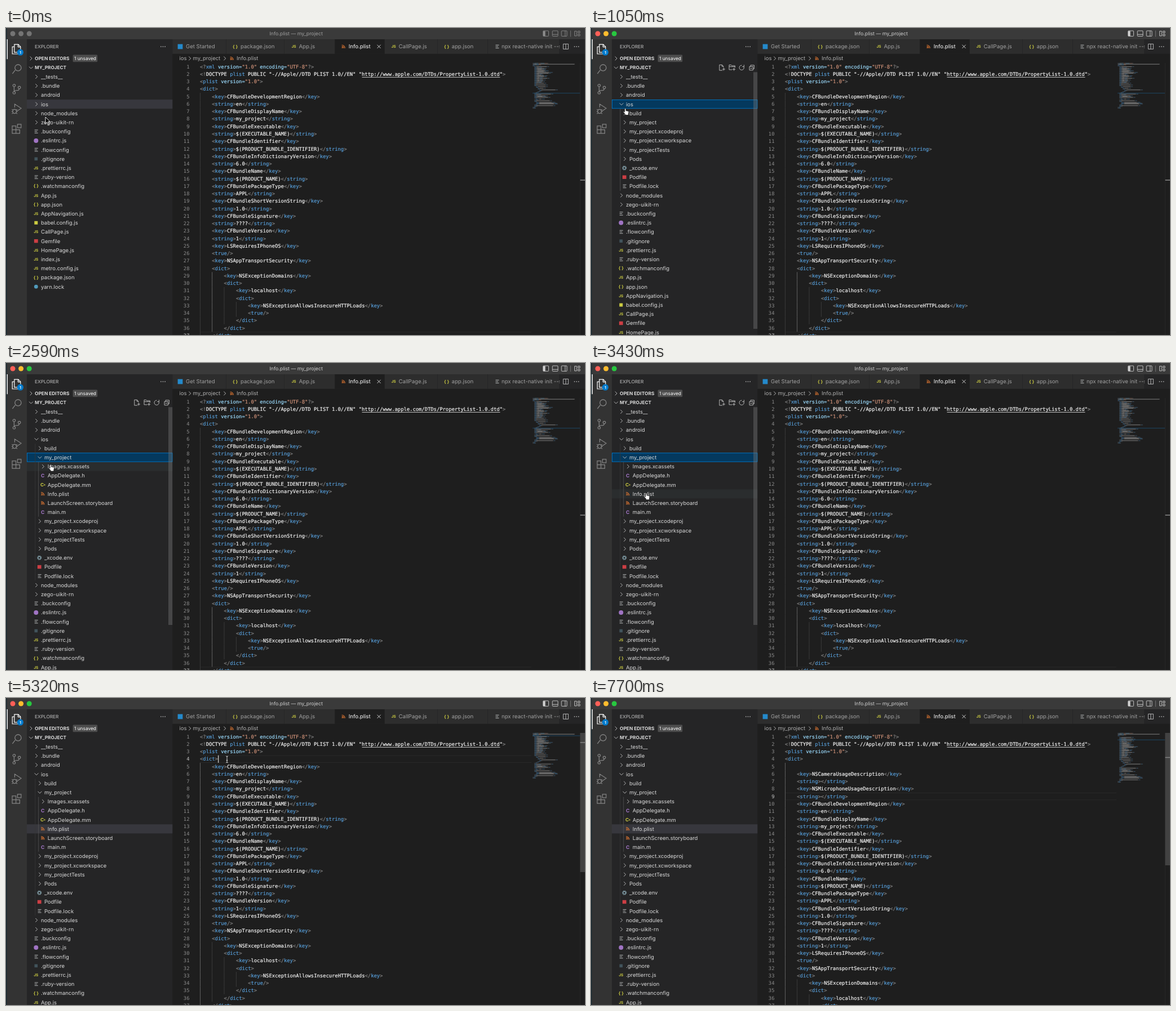
Write an HTML page that moves like this. It is 1027 by 545 pixels and loops after 8 s.

```html
<!DOCTYPE html>
<html lang="en">
<head>
<meta charset="utf-8">
<title>Info.plist — my_project</title>
<style>
html, body { margin: 0; width: 100%; height: 100%; overflow: hidden; background: #1e1e1e; }
svg { display: block; width: 100vw; height: 100vh; }
text { white-space: pre; text-rendering: geometricPrecision; font-family: Inter, "Liberation Sans", sans-serif; }
.m { font-family: "DejaVu Sans Mono", "Liberation Mono", monospace; font-size: 8.843px; stroke-width: .2px; }
.b { font-weight: 700; }
</style>
</head>
<body>
<svg viewBox="0 0 1027 545">
  <g id="frame"></g><g id="focus"></g><g id="tree"></g><g id="code"></g><g id="bar"></g><g id="caret"></g><g id="mouse"></g>
</svg>
<script>
const LOOP = 8000, STEP = 70;
const ROW = 16.205, TOP = 78.4;              // sidebar rows
const LINE = 13.257, CH = 5.324, X0 = 344, Y0 = 62; // editor grid
const MINI = 1.473, MCH = 0.7365;            // minimap grid
const YELLOW = '#cbcb41', RED = '#cc3e44', PURPLE = '#a074c4', ORANGE = '#e37933', GREY = '#c5c5c5';
const PUNCT = '#808080', TAG = '#569cd6', ATTR = '#9cdcfe', STRING = '#ce9178', PLAIN = '#f4f4f4';
const $ = id => document.getElementById(id);

const esc = s => s.replace(/&/g, '&amp;').replace(/</g, '&lt;').replace(/>/g, '&gt;');
const rect = (x, y, w, h, fill, more = '') => `<rect x="${x}" y="${y}" width="${w}" height="${h}" fill="${fill}" ${more}/>`;
const disc = (x, y, r, fill) => `<circle cx="${x}" cy="${y}" r="${r}" fill="${fill}"/>`;
const line = (d, c = GREY, w = 0.9, fill = 'none') => `<path d="${d}" stroke="${c}" stroke-width="${w}" fill="${fill}"/>`;
const text = (x, y, s, fill = '#dadada', size = 9.5, more = '') =>
  `<text x="${x}" y="${y + size * 0.36}" font-size="${size}" fill="${fill}" ${more}>${esc(s)}</text>`;
const at = (x, y, s) => `<g transform="translate(${x} ${y})">${s}</g>`;
const chevron = (x, y, open) => line(open ? `M${x - 3.4} ${y - 1.7}l3.4 3.4l3.4-3.4` : `M${x - 1.7} ${y - 3.4}l3.4 3.4l-3.4 3.4`);
const dots = (x, y) => [-3.6, 0, 3.6].map(d => disc(x + d, y, 0.85, GREY)).join('');

// File icons, centred on x, y
const icons = {
  js: (x, y) => text(x, y, 'JS', YELLOW, 6.6, 'class="b" text-anchor="middle"'),
  json: (x, y) => text(x, y - 0.3, '{ }', YELLOW, 7.8, 'class="b" text-anchor="middle"'),
  txt: (x, y) => line(`M${x - 2.6} ${y - 2.7}h6M${x - 2.6} ${y}h4.6M${x - 2.6} ${y + 2.7}h6`, '#c4c8c8', 0.9),
  lint: (x, y) => disc(x, y, 4, PURPLE),
  git: (x, y) => rect(x - 2.8, y - 2.8, 5.6, 5.6, '#41535b'),
  babel: (x, y) => rect(x - 3, y - 3, 6, 6, YELLOW),
  gem: (x, y) => rect(x - 3.4, y - 3.2, 6.8, 6.4, RED),
  yarn: (x, y) => disc(x, y, 3.4, '#519aba'),
  gear: (x, y) => `<circle cx="${x}" cy="${y}" r="3.4" fill="none" stroke="#7d98a1" stroke-width="1.4" stroke-dasharray="1.5 1.17"/>` +
    `<circle cx="${x}" cy="${y}" r="2.3" fill="none" stroke="#7d98a1" stroke-width="1.4"/>`,
  rss: (x, y) => disc(x - 2, y + 2, 0.9, ORANGE) +
    line(`M${x - 2.9} ${y - 0.4}a3.3 3.3 0 0 1 3.3 3.3M${x - 2.9} ${y - 2.7}a5.6 5.6 0 0 1 5.6 5.6`, ORANGE, 1.1),
  c: (x, y) => text(x, y, 'C', PURPLE, 8.6, 'class="b" text-anchor="middle"'),
  cpp: (x, y) => text(x - 4, y, 'C', YELLOW, 8.2, 'class="b"') + text(x + 1.3, y, '+', YELLOW, 6, 'class="b"')
};

function drawFrame() {
  const dim = '#858585';
  let s = rect(0, 0, 1027, 545, '#1e1e1e') + rect(0, 0, 1027, 20, '#3a3a3a') +
    rect(0, 20, 37, 525, '#333333') + rect(37, 20, 258.3, 525, '#252526') +
    rect(295.3, 20, 731.7, 25.8, '#252526') + rect(0, 0, 1.4, 545, '#14262e') +
    rect(1.6, 20, 1.4, 35.3, '#ffffff');
  // activity bar
  s += line('M14.8 29.2h7l4 4v10h-11zM14.6 33.4h-3.4v12.6h9.6v-2.8M21.4 29.4v4.2h4.2', '#ffffff', 1.2) +
    disc(25.4, 43.2, 5.6, '#007acc') + text(25.4, 43.2, '1', '#fff', 6.8, 'class="b" text-anchor="middle"') +
    line('M16.2 74.8L11.4 81.2M27 70.6a5.6 5.6 0 1 1-11.2 0a5.6 5.6 0 1 1 11.2 0', dim, 1.3) +
    line('M16.6 102a2.2 2.2 0 1 1-4.4 0a2.2 2.2 0 1 1 4.4 0M16.6 115a2.2 2.2 0 1 1-4.4 0a2.2 2.2 0 1 1 4.4 0M25.8 105.6a2.2 2.2 0 1 1-4.4 0a2.2 2.2 0 1 1 4.4 0M14.4 104.2v8.6M23.6 107.8q-.4 3-4 3h-2q-3 0-3.2 2', dim, 1.2) +
    line('M15.4 141v-6l11.6 7.4l-7.4 5M18.4 148a3.2 3.6 0 1 1-6.4 0a3.2 3.6 0 1 1 6.4 0M10.4 144.6l2 1.4M20 144.6l-2 1.4M10 148.4h2M20.4 148.4h-2M10.4 152.4l2-1.6M20 152.4l-2-1.6', dim, 1.2) +
    line('M11 173.8h6.6v13.4h-6.6zM11 180.6h13.4v6.6h-13.4M20.4 170.8h6.4v6.4h-6.4z', dim, 1.2);
  // sidebar headings
  s += text(51, 33, 'EXPLORER', '#c4c4c4', 8.3) + dots(278.5, 33) + chevron(44.4, 54, false) +
    text(51, 54, 'OPEN EDITORS', '#dadada', 8.35, 'class="b"') +
    rect(118.6, 47.6, 43.6, 12.6, '#4d4d4d', 'rx="1.5"') + text(121, 54, '1 unsaved', '#ffffff', 8.3) +
    chevron(44.4, 70.4, true) + text(51, 70.4, 'MY_PROJECT', '#dadada', 8.2, 'class="b"');
  // tabs: left, right, icon x, label x, icon, label
  const tabs = [
    [295.3, 391, 309, 319, '', 'Get Started'], [391, 494, 406.5, 416, 'json', 'package.json'],
    [494, 583.6, 510.5, 519.5, 'js', 'App.js'], [583.6, 672, 598.5, 607.8, 'rss', 'Info.plist'],
    [672, 766, 687.5, 696.5, 'js', 'CallPage.js'], [766, 855, 781.5, 790.5, 'json', 'app.json'],
    [855, 982, 871, 879, 'txt', 'npx react-native init --s']];
  s += '<clipPath id="strip"><rect x="295" y="20" width="687" height="26"/></clipPath><g clip-path="url(#strip)">';
  for (const [l, r, ix, lx, icon, name] of tabs) {
    const on = icon === 'rss';
    s += rect(l, 20, r - l - 0.7, 25.8, on ? '#1e1e1e' : '#2d2d2d') +
      (icon ? icons[icon](ix, 33) : rect(ix - 4.4, 28.6, 8.8, 8.8, '#2489ca')) +
      text(lx, 33, name, on ? '#ffffff' : '#a0a0a0', 9.6);
  }
  s += '</g>' + line('M658.4 29.8l6.2 6.2M664.6 29.8l-6.2 6.2', '#e0e0e0') +
    line('M988.4 28.4h9v9h-9zM992.9 28.4v9') + dots(1012, 33);
  // breadcrumbs
  const crumb = '#b0b0b0';
  s += text(307.5, 54, 'ios', crumb) + chevron(326, 54) + text(331.5, 54, 'my_project', crumb) +
    chevron(388, 54) + icons.rss(400.5, 54) + text(409, 54, 'Info.plist', crumb);
  return s;
}

// Title bar parts that change when the window gains focus
function drawFocus(on) {
  const lights = on ? ['#ff5f57', '#febc2e', '#28c840'] : Array(3).fill('#747474');
  const tint = on ? '#d0d0d0' : '#8c8c8c';
  const pane = x => `<rect x="${x - 4.8}" y="5" width="9.8" height="9.6" rx="1" fill="none" stroke="${tint}" stroke-width=".9"/>`;
  return lights.map((c, i) => disc(12 + 14.6 * i, 10, 4.5, c)).join('') +
    text(514.6, 10, 'Info.plist — my_project', on ? '#d0d0d0' : '#a0a0a0', 8.8, 'text-anchor="middle"') +
    pane(957.5) + rect(953, 5.4, 3.6, 8.8, tint) + pane(974) + line('M969.2 11.4h9.8', tint) +
    pane(990) + line('M991.8 5v9.6', tint) + line('M1001.5 4.5v11', '#777') +
    line('M1008.6 5.6h3.6v8.4h-3.6zM1014.6 5.6h3.4v3h-3.4zM1014.6 11h3.4v3h-3.4z', tint);
}

const headActions =
  line('M233.4 75.2h-5.6v-9.8h4.6l2.4 2.4v2M232.2 65.6v2.6h2.6M235.4 70.6v5M232.9 73.1h5') +
  line('M250.6 74h-5.6v-8.4h3.6l1.2 1.4h5.6v3.4M245 68.6h10M253.6 70.8v5M251.1 73.3h5') +
  line('M270.9 68.4a4.2 4.2 0 1 1-3.4-2.2M271.4 65.4v3.2h-3.2') +
  line('M281 68.4h6.4v6.4h-6.4zM283 68.2v-2.2h6.4v6.4h-2M282.6 71.6h3.2');

// Each entry: icon (or > folder, v open folder) and label
const split = (s, depth) => s.split('|').map(e => [...e.split(' '), depth]);
const HEAD = split('> __tests__|> .bundle|> android', 0);
const IOS = split('> my_project.xcodeproj|> my_project.xcworkspace|> my_projectTests|> Pods|gear _xcode.env|gem Podfile|txt Podfile.lock', 1);
const APP = split('> Images.xcassets|c AppDelegate.h|cpp AppDelegate.mm|rss Info.plist|rss LaunchScreen.storyboard|c main.m', 2);
const TAIL = split('> node_modules|> zego-uikit-rn|txt .buckconfig|lint .eslintrc.js|txt .flowconfig|git .gitignore|js .prettierrc.js|txt .ruby-version|json .watchmanconfig|js App.js|json app.json|js AppNavigation.js|babel babel.config.js|js CallPage.js|gem Gemfile|js HomePage.js|js index.js|js metro.config.js|json package.json|yarn yarn.lock', 0);

function drawTree({ open, sel, focus, hover, actions, scroll }) {
  const rows = [...HEAD, [open ? 'v' : '>', 'ios', 0]];
  if (open) rows.push(['>', 'build', 1], [open > 1 ? 'v' : '>', 'my_project', 1], ...(open > 1 ? APP : []), ...IOS);
  rows.push(...TAIL);
  const fill = (i, c) => rect(37, TOP + i * ROW, 258.3, ROW, c);
  let s = '';
  if (hover >= 0 && hover !== sel) s += fill(hover, '#2a2d2e');
  s += fill(sel, focus ? '#04395e' : '#37373d');
  if (focus) s += rect(37.4, TOP + sel * ROW + 0.4, 257.5, ROW - 0.8, 'none', 'stroke="#007fd4" stroke-width=".8"');
  rows.forEach(([kind, name, d], i) => {
    const y = TOP + (i + 0.5) * ROW, dx = d * 5.9;
    if (y > 560) return;
    for (let g = 1; g <= d; g++)
      s += rect(45.6 + g * 5.9, y - ROW / 2, 0.75, ROW, g === open ? '#585858' : '#383838');
    s += kind === '>' || kind === 'v' ? chevron(54 + dx, y, kind === 'v') : icons[kind](53.3 + dx, y);
    s += text(62 + dx, y, name, '#dadada', 9.45);
  });
  if (scroll) s += rect(288, TOP, 7.2, (open > 1 ? 465 : 534) - TOP, '#797979', 'opacity=".4"');
  return s + (actions ? headActions : '');
}

// Property list
const str = v => `<string>${v}</string>`;
const pairs = list => list.split('|').flatMap(p => {
  const [k, v] = p.split(':');
  return [`<key>${k}</key>`, ...(v === undefined ? [] : [v[0] === '<' ? v : str(v)])];
});
const PLIST = [
  '<?xml version="1.0" encoding="UTF-8"?>',
  '<!DOCTYPE plist PUBLIC "-//Apple//DTD PLIST 1.0//EN" "http://www.apple.com/DTDs/PropertyList-1.0.dtd">',
  '<plist version="1.0">', '<dict>',
  ...pairs('CFBundleDevelopmentRegion:en|CFBundleDisplayName:my_project|CFBundleExecutable:$(EXECUTABLE_NAME)|CFBundleIdentifier:$(PRODUCT_BUNDLE_IDENTIFIER)|CFBundleInfoDictionaryVersion:6.0|CFBundleName:$(PRODUCT_NAME)|CFBundlePackageType:APPL|CFBundleShortVersionString:1.0|CFBundleSignature:????|CFBundleVersion:1|LSRequiresIPhoneOS:<true/>|NSAppTransportSecurity'),
  '<dict>', ...pairs('NSExceptionDomains'), '<dict>', ...pairs('localhost'), '<dict>',
  ...pairs('NSExceptionAllowsInsecureHTTPLoads:<true/>'), '</dict>', '</dict>', '</dict>',
  ...pairs('NSLocationWhenInUseUsageDescription:|UILaunchStoryboardName:LaunchScreen|UIRequiredDeviceCapabilities'),
  '<array>', str('armv7'), '</array>', ...pairs('UISupportedInterfaceOrientations'), '<array>',
  ...['Portrait', 'LandscapeLeft', 'LandscapeRight'].map(o => str('UIInterfaceOrientation' + o)), '</array>',
  ...pairs('UIViewControllerBasedStatusBarAppearance:<false/>'), '</dict>', '</plist>'];
const PASTE = pairs('NSCameraUsageDescription:|NSMicrophoneUsageDescription:');

function tokens(s) {
  const doctype = s.match(/^(<!)(DOCTYPE )(\w+)(.*)(>)$/);
  if (doctype) return [PUNCT, PLAIN, TAG, PLAIN, PUNCT].map((c, i) => [doctype[i + 1], c]);
  const out = [];
  let inside = false;
  for (const [all, lt, tag, gt, quoted] of s.matchAll(/(<[?\/]?)(\w+)|([?\/]?>)|("[^"]*")|[^<>"]+/g)) {
    if (lt) { out.push([lt, PUNCT], [tag, TAG]); inside = true; }
    else if (gt) { out.push([gt, PUNCT]); inside = false; }
    else out.push([all, quoted ? STRING : inside ? ATTR : PLAIN]);
  }
  return out;
}

// Cursor line, overview mark and slider end for each editing phase
const PHASES = [
  { row: 37, mark: 270, end: 309 }, { row: 4, col: 6, mark: 79, end: 309 },
  { row: 5, col: 0, mark: 84.5, end: 306 }, { row: 9, col: 21, mark: 105.5, end: 297 }];

function drawCode(phase) {
  const { row, mark } = PHASES[phase], lines = PLIST.slice();
  if (phase > 1) lines.splice(4, 0, '', ...(phase > 2 ? PASTE : []));
  const y = Y0 + (row - 1) * LINE;
  let s = line(`M${X0} ${y + 0.5}H932M${X0} ${y + LINE - 0.5}H932`, '#292929', 1.1);
  s += rect(934, Y0 + (row - 1) * MINI, 84, 1.2, '#1d4059');
  let mini = '', depth = 0;
  lines.forEach((l, i) => {
    if (/^<\/(dict|array)/.test(l)) depth--;
    const top = Y0 + i * LINE, parts = tokens(l);
    if (top < 545) {
      for (let g = 0; g < depth; g++) {
        const lit = phase ? g === 0 : g === 1;
        s += rect(X0 + g * 4 * CH, top, 0.8, LINE, lit ? '#707070' : '#404040');
      }
      const base = top + LINE / 2 + 3.06;
      s += `<text class="m" x="325.5" y="${base}" text-anchor="end" fill="${i + 1 === row ? '#c6c6c6' : '#8c8c8c'}">${i + 1}</text>`;
      s += `<text class="m" x="${X0 + depth * 4 * CH}" y="${base}">` +
        parts.map(([p, c]) => `<tspan fill="${c}" stroke="${c}">${esc(p)}</tspan>`).join('') + '</text>';
    }
    let x = 934 + depth * 4 * MCH;
    for (const [p, c] of parts) {
      mini += rect(x, Y0 + i * MINI + 0.25, p.length * MCH, 0.95, c);
      x += p.length * MCH;
    }
    if (/^<(dict|array)>/.test(l)) depth++;
  });
  s += line(`M${X0 + 54 * CH} 87.4h${46 * CH}`, PLAIN, 0.8);
  return s + `<g opacity=".48">${mini}</g>` + rect(1018, Y0, 0.7, 483, '#2b2b2b') + rect(1018.5, mark - 0.7, 8.5, 1.5, '#8a8a8a');
}

const BEAM = 'M-2-6q2 0 2 1.6V4.4q0 1.6-2 1.6M2-6q-2 0-2 1.6M2 6q-2 0-2-1.6M-1.3 1.6h2.6';
const MICE = {
  arrow: line('M0 0v11.6l2.7-2.5l1.9 4.3l1.9-.8l-1.9-4.2h3.6z', '#ffffff', 0.9, '#000000'),
  hand: line('M-1.2 6V1a1.1 1.1 0 0 1 2.2 0V4l4 .8q1.2.4 1 2L5.4 9.6V11.8H-.4V10.2L-3.6 6.6q.4-1.6 2.4-.2z', '#111111', 0.7, '#ffffff'),
  beam: line(BEAM, '#000000', 1.9) + line(BEAM, '#ffffff', 0.9)
};
// Pointer path: time, x, y
const PATH = [
  [0, 70, 158], [210, 70, 158], [700, 63, 138], [1050, 61, 142.8], [1820, 61, 166], [2310, 61, 166],
  [3150, 132, 221], [3430, 98, 231], [3500, 98, 231], [3640, 97, 230], [3990, 97, 230],
  [4410, 425, 181.5], [4480, 430, 178], [4550, 430, 178], [5250, 392, 109], [LOOP, 392, 109]];

function pointer(t) {
  const i = PATH.findIndex(p => p[0] > t), [t0, x0, y0] = PATH[i - 1], [t1, x1, y1] = PATH[i];
  const u = (t - t0) / (t1 - t0), e = u * u * (3 - 2 * u);
  return [x0 + (x1 - x0) * e, y0 + (y1 - y0) * e];
}

const last = {};
function put(id, state, draw) {
  const key = JSON.stringify(state);
  if (last[id] === key) return;
  last[id] = key;
  $(id).innerHTML = draw(state);
}

function show(time) {
  const t = Math.floor(time / STEP) * STEP;
  const [x, y] = pointer(t), active = t >= 700, side = x < 295;
  const phase = t < 5250 ? 0 : t < 6650 ? 1 : t < 7140 ? 2 : 3;
  const open = t < 910 ? 0 : t < 2170 ? 1 : 2;
  put('focus', active, drawFocus);
  put('tree', {
    open, sel: t < 2170 ? 3 : t < 3780 ? 5 : 9,
    focus: t >= 840 && !phase,
    hover: active && side ? Math.floor((y - TOP) / ROW) : -1,
    actions: active && !phase,
    scroll: open > 0 && t < 4690
  }, drawTree);
  put('code', phase, drawCode);
  put('bar', side ? 0 : PHASES[phase].end, end => end ? rect(1018.5, Y0, 8.5, end - Y0, '#797979', 'opacity=".4"') : '');
  const lit = phase > 0 && (t < 5810 || t >= 6300) && t < 7700;
  put('caret', lit ? phase : 0, p => p ? rect(X0 + PHASES[p].col * CH, Y0 + (PHASES[p].row - 1) * LINE, 1.4, LINE, '#c4c5c3') : '');
  const kind = t >= 6650 ? '' : !active ? 'arrow' : side ? 'hand' : 'beam';
  put('mouse', [kind, x, y], () => kind ? at(x, y, MICE[kind]) : '');
}

$('frame').innerHTML = drawFrame();
const start = performance.now();
function tick() {
  show((performance.now() - start) % LOOP);
  requestAnimationFrame(tick);
}
tick();
</script>
</body>
</html>
```
